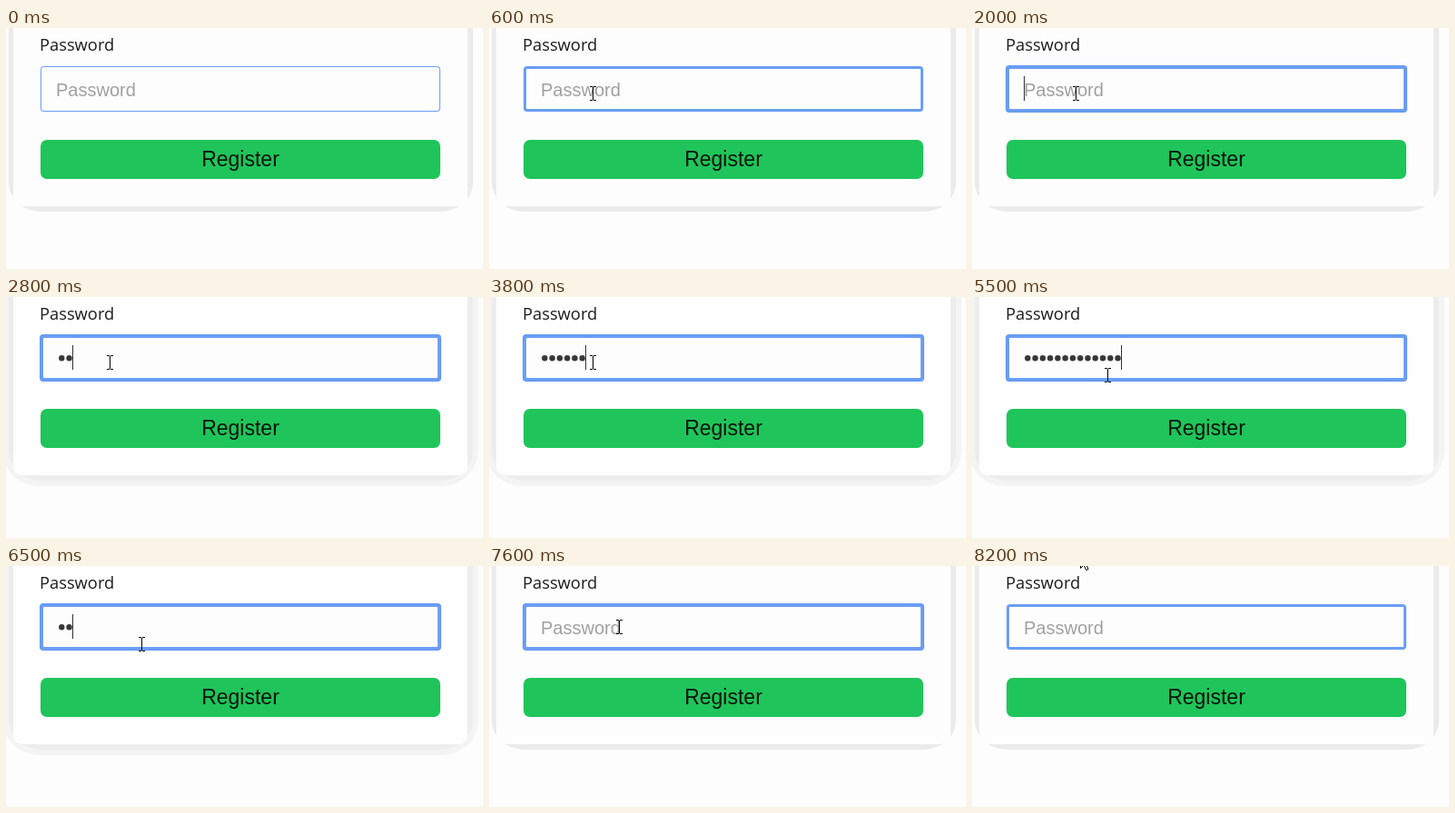
An HTML page that plays this animation: 525x265 px, repeating every 8.3 s.

```html
<!DOCTYPE html>
<html lang="en">
<head>
<meta charset="utf-8">
<title>Password field</title>
<style>
  html, body { margin: 0; width: 100%; height: 100%; overflow: hidden; background: #fdfdfd; }
  svg { display: block; }
  .label { font: 18.3px "Open Sans", sans-serif; fill: #1c1c1c; }
  .hint { font: 20px "Liberation Sans", Arial, sans-serif; fill: #a0a0a0; }
  .action { font: 23px "Liberation Sans", Arial, sans-serif; text-anchor: middle; fill: #06140b; }
  .crisp { shape-rendering: crispEdges; }
</style>
</head>
<body>
<svg width="525" height="265" viewBox="0 0 525 265">
  <rect id="glow" x="-4" y="-100" width="524" height="308" rx="40" fill="#f4f4f4"/>
  <rect id="shade" x="3" y="-100" width="511" height="302" rx="36" ry="32" fill="#ebebeb"/>
  <rect id="card" x="8" y="-100" width="500" height="296" rx="9" fill="#fdfdfd"/>

  <text class="label" x="37" y="25">Password</text>
  <rect id="ring" x="37" y="41" width="442" height="52" rx="4" fill="#6699f5"/>
  <rect x="38" y="42" width="440" height="50" rx="4" fill="#6a9ef5"/>
  <rect id="field" fill="#fdfdfd"/>
  <text id="hint" class="hint" y="75">Password</text>
  <g id="dots" fill="#383838"></g>
  <rect id="caret" class="crisp" y="53" width="1" height="27" fill="#333"/>

  <rect x="38" y="123" width="440" height="43" rx="7" fill="#1fc55a"/>
  <text class="action" x="258" y="152">Register</text>

  <path id="beam" class="crisp" d="M-3 -8h3v1h1v-1h3v1h-3v14h3v1h-3v-1h-1v1h-3v-1h3v-14h-3z"/>
  <path id="arrow" d="M.5 .5V16.5L4.2 13L6.7 18.6L9 17.6L6.6 12.2H11.7Z" fill="#fff" stroke="#000"/>
</svg>
<script>
  const LOOP = 8300, STEP = 8.27, MAX_DOTS = 13;
  const $ = id => document.getElementById(id);
  const set = (el, attrs) => Object.entries(attrs).forEach(([k, v]) => el.setAttribute(k, v));
  const show = (el, on) => { el.style.display = on ? "" : "none"; };

  // Each track is a list of [start, value]; a value holds until the next one.
  const at = (track, t) => track.reduce((v, [start, value]) => t >= start ? value : v, null);

  const border = [[0, 1], [300, 2], [400, 3]];
  const caretOn = [[0, 0], [1000, 1], [1500, 0], [2000, 1], [2500, 0], [2600, 1],
                   [5700, 0], [6200, 1], [7200, 0], [7700, 1], [8200, 0]];
  const typedAt = [2600, 2800, 3000, 3200, 3500, 3800, 4000, 4300, 4500, 4700, 4900, 5000, 5200];
  const count = [[0, 0], ...typedAt.map((t, i) => [t, i + 1]),
                 [5800, 12], [6200, 11], [6300, 8], [6400, 5], [6500, 2], [6600, 1], [6700, 0]];
  const pointer = [[0, null],
    [200, ["beam", 38, 12]], [300, ["beam", 60, 56]], [400, ["arrow", 92, 117]],
    [500, ["beam", 111, 84]], [600, ["beam", 114, 72]],
    [4100, ["beam", 119, 75]], [4200, ["beam", 125, 79]],
    [5200, ["beam", 140, 83]], [5300, ["beam", 150, 86]], [5500, ["beam", 149, 86]],
    [7300, ["beam", 148, 82]], [7500, ["beam", 146, 76]], [7600, ["beam", 143, 67]],
    [7700, ["beam", 139, 56]], [7800, ["beam", 135, 46]], [7900, ["arrow", 130, 32]],
    [8000, ["arrow", 126, 17]], [8100, ["arrow", 122, 2]], [8200, ["arrow", 119, -14]]];

  const dots = Array.from({ length: MAX_DOTS }, (_, i) => {
    const dot = document.createElementNS("http://www.w3.org/2000/svg", "circle");
    set(dot, { cx: 61.3 + i * STEP, cy: 67.3, r: 3.2 });
    return $("dots").appendChild(dot);
  });

  function draw(t) {
    const b = at(border, t), n = at(count, t), filled = n > 0;

    show($("glow"), filled);
    set($("shade"), { fill: filled ? "#ededed" : "#ebebeb" });
    set($("card"), { fill: filled ? "#fefefe" : "#fdfdfd" });

    set($("field"), { x: 38 + b, y: 42 + b, width: 440 - 2 * b, height: 50 - 2 * b, rx: 4 - b });
    show($("ring"), t >= 1000 && t < 8200);
    show($("hint"), !filled);
    set($("hint"), { x: 54 + b });
    dots.forEach((dot, i) => show(dot, i < n));
    show($("caret"), at(caretOn, t));
    set($("caret"), { x: Math.floor(57 + n * STEP) });

    const [kind, x, y] = at(pointer, t) || [];
    for (const id of ["beam", "arrow"]) {
      show($(id), id === kind);
      if (id === kind) set($(id), { transform: `translate(${x} ${y})` });
    }
  }

  const start = performance.now();
  function tick() {
    draw((performance.now() - start) % LOOP);
    requestAnimationFrame(tick);
  }
  tick();
</script>
</body>
</html>
```
